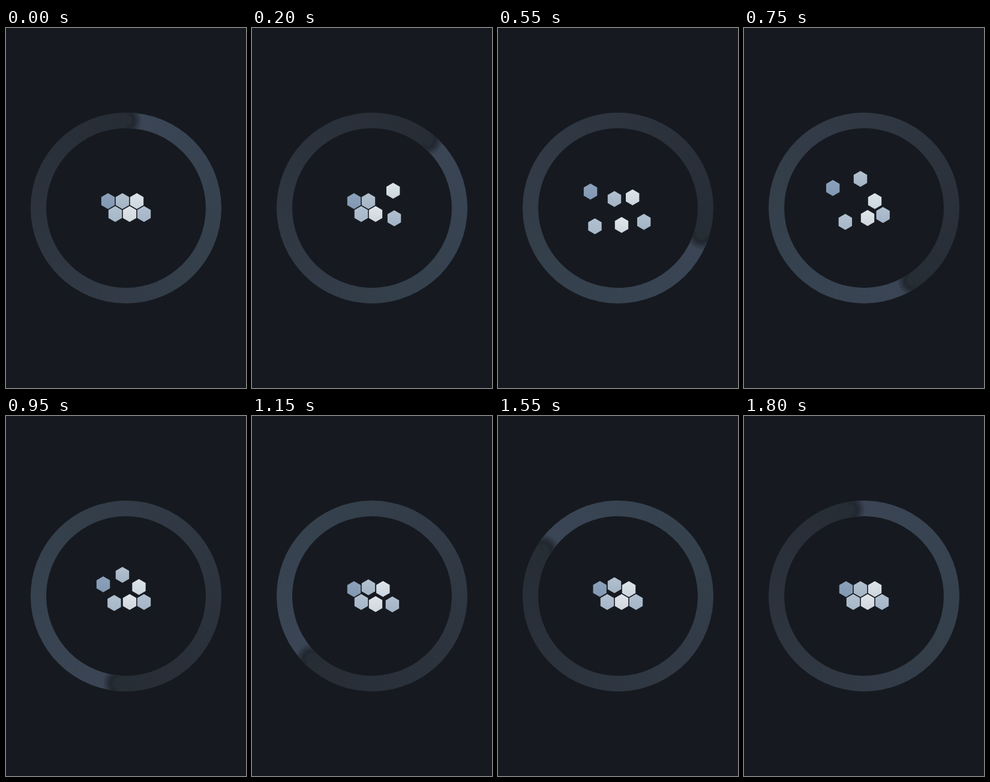
These frames come from a looping animation (400 px wide and 600 px high, 1.85 s). An HTML page with a canvas:

```html
<!DOCTYPE html>
<html lang="en">
<head>
<meta charset="utf-8">
<title>Hexagon loader</title>
<style>
  html, body { margin: 0; width: 100%; height: 100%; overflow: hidden; background: #161a20; }
  canvas { display: block; width: 400px; height: 600px; }
</style>
</head>
<body>
<canvas id="stage" width="400" height="600"></canvas>
<script>
const ctx = document.getElementById('stage').getContext('2d');
const TAU = Math.PI * 2;
const LOOP = 1850, STEP = 50, STAGGER = 100;
const BACK = '#161a20';
const RADIUS = 146, HALF = 13;

const ringStops = [
  [0, '#3b4555'], [0.12, '#394453'], [0.34, '#34404b'], [0.5, '#323b47'],
  [0.75, '#2c333d'], [0.9, '#292f38'], [1, '#262d35']
];

// Home position, direction, main swing, rebound, top and bottom colour; in order of departure.
const cells = [
  { x: 218, y: 288.5, dx: 1, dy: -1, swing: 19, rebound: 4.7, top: '#dde4ea', low: '#ccd5de' },
  { x: 230, y: 310, dx: 1, dy: 1, swing: 20.5, rebound: 4.8, top: '#b1c0d0', low: '#a3b4c7' },
  { x: 206, y: 310, dx: 0, dy: 1, swing: 20.3, rebound: 4.7, top: '#e0e5ea', low: '#d0d7de' },
  { x: 182, y: 310, dx: -1, dy: 1, swing: 20.5, rebound: 4.8, top: '#b2c1d0', low: '#a6b7c8' },
  { x: 170, y: 288.5, dx: -1, dy: -1, swing: 24.3, rebound: 4.6, top: '#8ca1ba', low: '#8298b2' },
  { x: 194, y: 288.5, dx: 0, dy: -1, swing: 37, rebound: 8, top: '#b3c1cf', low: '#a4b4c4' }
];

// Smooth rise from a to peak, smooth fall to b.
function pulse(t, a, peak, b) {
  if (t <= a || t >= b) return 0;
  const u = t < peak ? (t - a) / (peak - a) : (b - t) / (b - peak);
  return (1 - Math.cos(Math.PI * u)) / 2;
}

function drawRing(turn) {
  ctx.save();
  ctx.translate(200, 300);
  ctx.rotate(turn - Math.PI / 2);

  const sweep = ctx.createConicGradient(0, 0, 0);
  ringStops.forEach(([at, color]) => sweep.addColorStop(at, color));
  ctx.beginPath();
  ctx.arc(0, 0, RADIUS + HALF, 0, TAU);
  ctx.arc(0, 0, RADIUS - HALF, 0, TAU, true);
  ctx.fillStyle = sweep;
  ctx.fill();

  // Shadow in front of the head
  const shade = ctx.createRadialGradient(RADIUS, 0, HALF - 4, RADIUS, 0, HALF * 2 + 1);
  shade.addColorStop(0, 'rgba(24,28,34,0.85)');
  shade.addColorStop(0.3, 'rgba(24,28,34,0.7)');
  shade.addColorStop(1, 'rgba(24,28,34,0)');
  ctx.beginPath();
  ctx.arc(0, 0, RADIUS + HALF, 0, 0.25);
  ctx.arc(0, 0, RADIUS - HALF, 0.25, 0, true);
  ctx.closePath();
  ctx.fillStyle = shade;
  ctx.fill();

  // Round head, softening into its shadow
  const head = ctx.createRadialGradient(RADIUS, 0, HALF - 5, RADIUS, 0, HALF);
  head.addColorStop(0, '#262d35');
  head.addColorStop(1, 'rgba(38,45,53,0.25)');
  ctx.beginPath();
  ctx.arc(RADIUS, 0, HALF, 0, Math.PI);
  ctx.fillStyle = head;
  ctx.fill();
  ctx.restore();
}

function drawCell(cell, t) {
  const shift = cell.swing * pulse(t, 0, 250, 740) + cell.rebound * pulse(t, 850, 1000, 1180);
  const x = cell.x + cell.dx * shift;
  const y = cell.y + cell.dy * shift;
  const fill = ctx.createLinearGradient(0, y - 13, 0, y + 13);
  fill.addColorStop(0, cell.top);
  fill.addColorStop(1, cell.low);
  ctx.beginPath();
  [[0, -13.3], [11.2, -6.8], [11.2, 6.8], [0, 13.3], [-11.2, 6.8], [-11.2, -6.8]]
    .forEach(([px, py]) => ctx.lineTo(x + px, y + py));
  ctx.closePath();
  ctx.fillStyle = fill;
  ctx.fill();
}

function frame() {
  const t = Math.floor(performance.now() % LOOP / STEP) * STEP;
  ctx.fillStyle = BACK;
  ctx.fillRect(0, 0, 400, 600);
  drawRing(t / LOOP * TAU);
  cells.forEach((cell, i) => drawCell(cell, t - i * STAGGER));
  requestAnimationFrame(frame);
}
frame();
</script>
</body>
</html>
```
